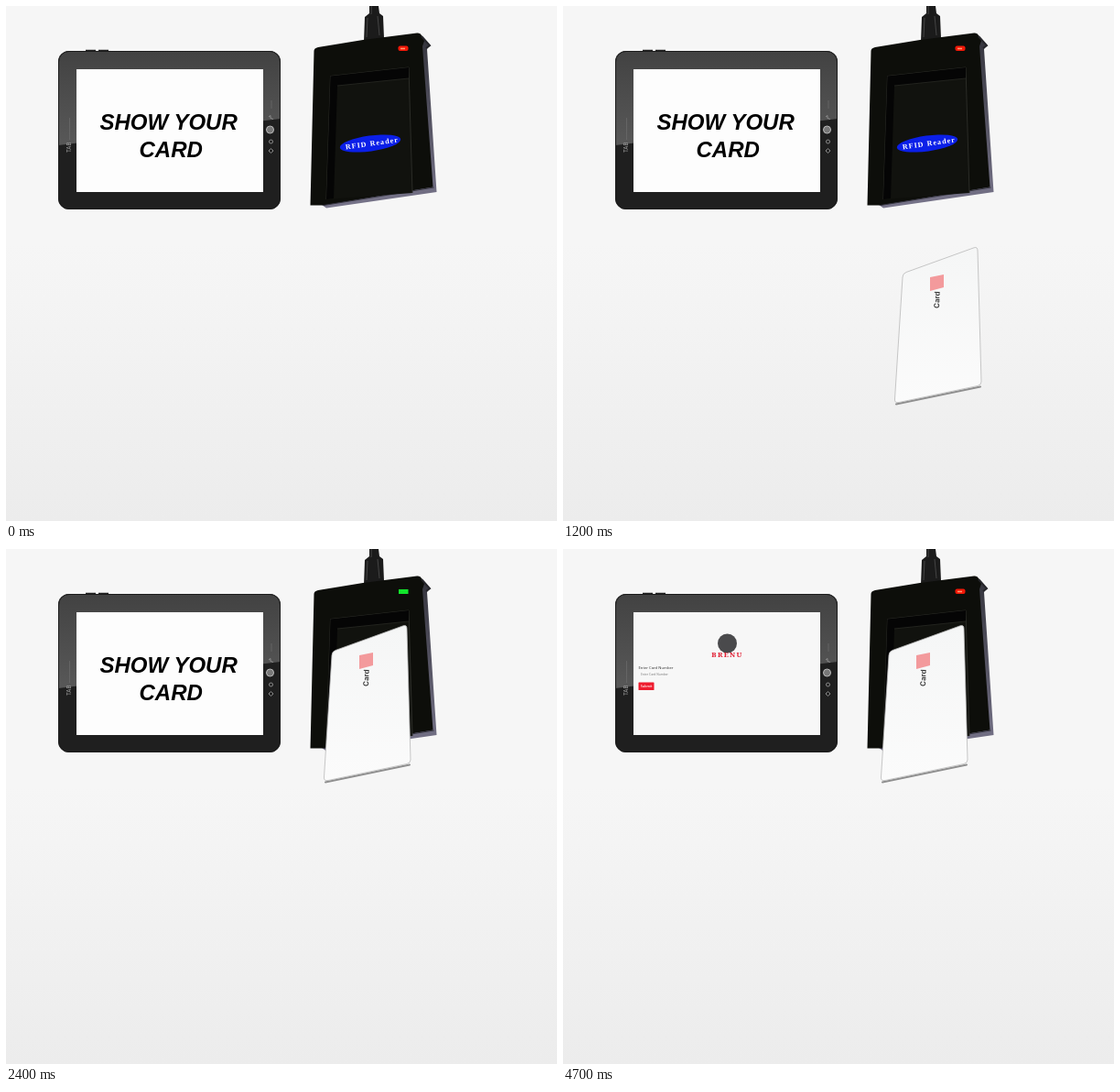
An HTML page for the animation above (5700 ms loop, 602x562 px).

```html
<!DOCTYPE html>
<html lang="en">
<head>
<meta charset="utf-8">
<title>Card reader</title>
<style>
html, body { margin: 0; width: 100%; height: 100%; overflow: hidden; background: #f6f6f6; }
svg { display: block; width: 602px; height: 562px; }
text { white-space: pre; }
.prompt { font: italic bold 24px "Liberation Sans", Arial, sans-serif; }
.ui { font: 4.2px "Open Sans", "Noto Sans", sans-serif; fill: #333; }
.hint { font-size: 3.3px; fill: #777; }
.title { font-size: 7.4px; font-weight: 500; fill: #111; }
.light { fill: #fff; }
.brand { font: 900 7.8px "Noto Serif", serif; letter-spacing: 1.3px; fill: #e0182d; text-anchor: middle; }
.button { font-size: 3.7px; font-weight: 600; fill: #fff; }
.round { font-family: "Liberation Sans", Arial, sans-serif; stroke-linejoin: round; }
</style>
</head>
<body>
<svg viewBox="0 0 602 562">
  <defs>
    <linearGradient id="floor" x2="0" y2="1">
      <stop offset=".46" stop-color="#f6f6f6"/><stop offset="1" stop-color="#ececec"/>
    </linearGradient>
    <linearGradient id="sky" x2="0" y2="1">
      <stop offset=".05" stop-color="#fff"/><stop offset=".48" stop-color="#f5f5f5"/><stop offset="1" stop-color="#ececec"/>
    </linearGradient>
    <linearGradient id="gloss" x2="0" y2="1">
      <stop stop-color="#424242"/><stop offset=".4" stop-color="#4b4b4b"/><stop offset="1" stop-color="#585858"/>
    </linearGradient>
    <linearGradient id="side" x2="0" y2="1">
      <stop stop-color="#34343c"/><stop offset="1" stop-color="#77748a"/>
    </linearGradient>
    <linearGradient id="paper" x2="0" y2="1">
      <stop stop-color="#f5f6f6"/><stop offset="1" stop-color="#fbfbfb"/>
    </linearGradient>
    <clipPath id="case"><rect x="57" y="49" width="243" height="173" rx="12"/></clipPath>
    <g id="logo">
      <circle cy="-15" r="10.5" fill="#4a4a4c"/>
      <text class="brand">BRENU</text>
    </g>
    <g id="submit">
      <rect width="17" height="8.5" rx=".6" fill="#ee1c2e"/>
      <text class="button" x="2.3" y="5.6">Submit</text>
    </g>
  </defs>

  <g id="scene">
    <rect width="602" height="562" fill="url(#floor)"/>

    <!-- Tablet -->
    <path d="M87 48.500h11m3 0h11" stroke="#222" stroke-width="1.500"/>
    <g clip-path="url(#case)">
      <rect x="57" y="49" width="243" height="173" fill="#1f1f1f"/>
      <path d="M57 49H300V123L57 152Z" fill="url(#gloss)"/>
    </g>
    <rect x="57.500" y="49.500" width="242" height="172" rx="11.500" fill="none" stroke="#1c1c1c"/>
    <rect x="77" y="69" width="204" height="134" fill="#fdfdfd"/>
    <path d="M69.500 122v24M290 103v9" stroke="#6a6a6a" stroke-width=".8"/>
    <text transform="translate(71 160) rotate(-90)" font-family="Inter, sans-serif" font-size="6" fill="#aaa">TAB</text>
    <g fill="none" stroke="#8c8c8c">
      <path d="M287 121l2-1.500v3l3 1"/>
      <circle cx="288.500" cy="135" r="4" fill="#777" stroke="#bbb"/>
      <circle cx="289.500" cy="148" r="2"/>
      <path d="M289.500 155.500l2.500 2.500-2.500 2.500-2.500-2.500Z"/>
    </g>

    <g id="ask" class="prompt">
      <text x="102.500" y="134.500">SHOW YOUR</text>
      <text x="145.500" y="164.500">CARD</text>
    </g>

    <g id="form" class="ui">
      <rect x="77" y="69" width="204" height="134" fill="#f9f9f9"/>
      <use href="#logo" x="187" y="98.500"/>
      <text class="title" x="81" y="109.500">User Name/ 1234 1234 1234</text>
      <rect x="82" y="112" width="199" height="48" fill="#f2f2f2"/>
      <rect x="82" y="123.500" width="199" height="10" fill="#f01c2d"/>
      <text x="84" y="119.800">Up 3284687645</text>
      <text class="light" x="84" y="130.300">Up 3284687645</text>
      <text x="84" y="140.800">Up 3284687645</text>
      <text x="83" y="149">If other:</text>
      <rect x="82.500" y="151.500" width="198.500" height="8.500" fill="#fcfcfc" stroke="#ddd" stroke-width=".5"/>
      <text class="hint" x="86" y="157.300">Enter Car No.</text>
      <text x="83" y="176">Qty (Litres)</text>
      <text x="188" y="176">Meter Reading:</text>
      <path d="M83 178.500h92v8.500h-92zM188 178.500h92v8.500h-92z" fill="#fcfcfc"/>
      <text class="hint" x="86" y="183.500">Enter Quantity</text>
      <text class="hint" x="190" y="183.500">Enter Meter reading</text>
      <use href="#submit" x="83" y="191.300"/>
    </g>

    <g id="manual" class="ui">
      <rect x="77" y="69" width="204" height="134" fill="#f7f7f7"/>
      <use href="#logo" x="179.500" y="118"/>
      <text x="82.500" y="131">Enter Card Number</text>
      <text class="hint" x="85" y="138.300">Enter Card Number</text>
      <use href="#submit" x="82.500" y="145.500"/>
    </g>

    <!-- Reader -->
    <path d="M397 0h10l1 8 4 3 1 24-22 4 1-27 5-4Z" fill="#1b1b1b"/>
    <path d="M395 13l-1 21M406 11l2 21M399 0v9" stroke="#444"/>
    <path d="M452 31L463.500 43 460 47 470.500 203 350 220.500 345 217Z" fill="url(#side)"/>
    <path d="M336.500 49Q336.500 46 341 45L390 37 449 29.500Q453 29 454 32L457 38 455 44 466.500 197.500 347 217.500 332.500 217.500Z" fill="#0d0e0a"/>
    <path d="M454 33l9 10-4 3" fill="none" stroke="#25252a" stroke-width="2"/>
    <path d="M347 217.500L467.500 198" stroke="#34333e"/>
    <path d="M350 211L354.500 76.500 440 67 444 204" fill="#11120e" stroke="#2b2c27"/>
    <path d="M354.500 76.500L440 67V79L362 87 358 210 350 211Z" fill="#050505"/>
    <path d="M362 87L440 79" stroke="#22231e"/>
    <g transform="translate(398 150) rotate(-8)">
      <ellipse rx="33.500" ry="8.500" fill="#0b1fe8"/>
      <text x="-27.500" y="2.700" font-family="Liberation Serif, Times, serif" font-size="8" font-weight="bold" letter-spacing="1.100" fill="#fff">RFID Reader</text>
    </g>
    <g id="red">
      <rect x="428.500" y="43.500" width="11" height="5.500" rx="2" fill="#f21808"/>
      <path d="M431 46.500h5" stroke="#ff9a70" stroke-width="1.500"/>
    </g>
    <rect id="green" x="429" y="44" width="10.500" height="5" fill="#12e52c"/>

    <!-- Card, placed by its upper right corner -->
    <g id="card">
      <path d="M-89 171.500L3 152.500" stroke="#8f8f8f" stroke-width="2" stroke-linecap="round"/>
      <path d="M-82 33Q-82 29 -78 27.500L-4 .8Q0 -.5 0 4L4 147Q4 150.500 0 151.500L-86 169.500Q-91 170.500 -90.500 166Z" fill="url(#paper)" stroke="#b9b9b9" stroke-width=".8"/>
      <path d="M-52 33l15-3v14l-15 4Z" fill="#f39a9c"/>
      <text transform="translate(-42 67) rotate(-88)" font-family="Inter, sans-serif" font-size="8" font-weight="600" fill="#333">Card</text>
    </g>
  </g>

  <g id="notice" class="round">
    <rect width="602" height="562" fill="url(#sky)"/>
    <g font-size="54" font-style="italic" stroke="#000" stroke-width="3.200">
      <text x="115.500" y="236" letter-spacing="2.400">IF CARD NOT</text>
      <text x="116" y="304" letter-spacing="3.900">SCANNING</text>
    </g>
    <text x="113" y="352.500" font-size="37.500" fill="#f00" stroke="#f00" stroke-width="1.200" letter-spacing="1.300">ENTER CARD NO.</text>
  </g>
</svg>
<script>
const LOOP = 5700, STEP = 300;
// Card corner at each step; it then rests at the last place.
const path = [[453, 600], [453, 425], [453, 371], [453, 317], [453, 263], [446, 188], [438, 113], [438, 83]];
const $ = id => document.getElementById(id);
const show = (id, on) => $(id).style.display = on ? "" : "none";

function draw(now) {
  const t = now % LOOP;
  const spot = path[Math.min(Math.floor(t / STEP), path.length - 1)];
  const notice = t >= 3700 && t < 4700;
  const lit = t >= 2400 && t < 3700;
  $("card").setAttribute("transform", `translate(${spot})`);
  show("ask", t < 2700);
  show("form", t >= 2700 && t < 3700);
  show("manual", t >= 4700);
  show("green", lit);
  show("red", !lit);
  show("notice", notice);
  show("scene", !notice);
}

const start = performance.now();
function tick() {
  draw(performance.now() - start);
  requestAnimationFrame(tick);
}
tick();
</script>
</body>
</html>
```
